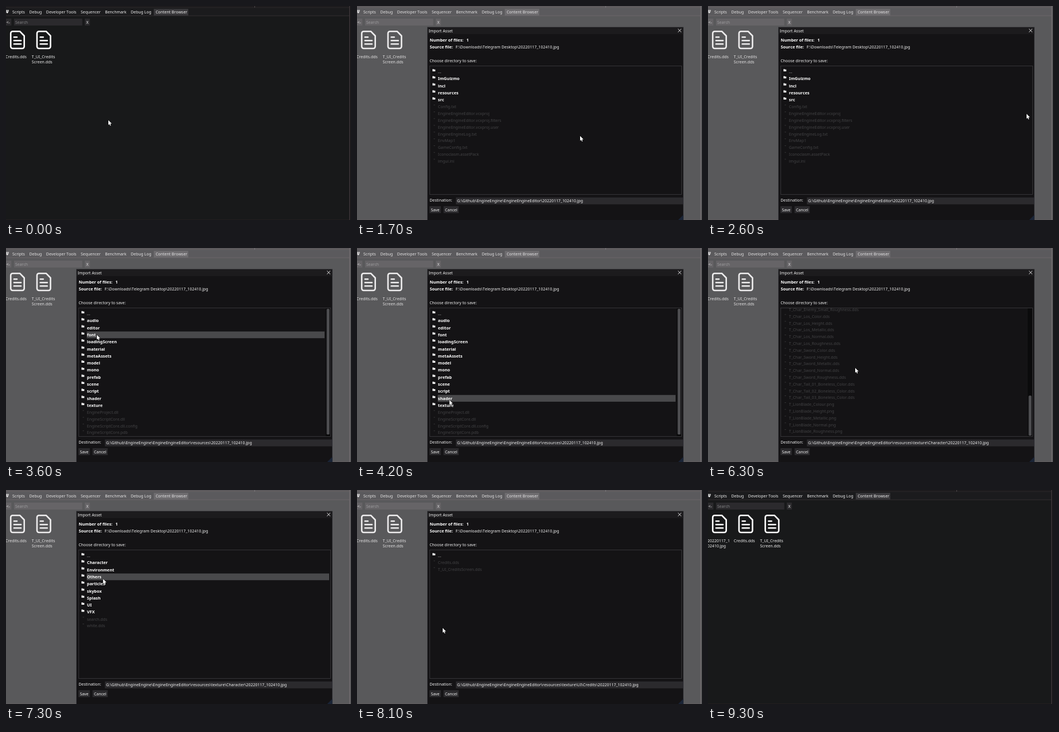
These frames come from a looping animation (600 px wide and 373 px high, 9500 ms). An HTML page with a canvas:

```html
<!DOCTYPE html>
<html lang="en">
<head>
<meta charset="utf-8">
<title>Import Asset</title>
<style>
html, body { margin: 0; width: 100%; height: 100%; overflow: hidden; background: #18191a; }
canvas { display: block; width: 600px; height: 373px; }
</style>
</head>
<body>
<canvas id="stage"></canvas>
<script>
const W = 600, H = 373, LOOP = 9500, STEP = 100;
const canvas = document.getElementById('stage');
const ctx = canvas.getContext('2d');
const dpr = window.devicePixelRatio || 1;
canvas.width = W * dpr;
canvas.height = H * dpr;
ctx.fontKerning = 'none';

const FAMILY = '"Noto Sans", "Open Sans", sans-serif';
const REGULAR = 6.93, BOLD = 7.3, EM = 40;
const FOLDER_ROW = 12.3, FILE_ROW = 11.8, FIRST_ROW = 114.5, LAST_ROW = 319.8;
const LIST = { x: 126.5, y: 104.5, w: 438, h: 224 };
const WHITE = '#f2f2f2', FIELD = '#2b2a2d';
const IMAGE = '20220117_102410.jpg';
const OPEN = 1600, CLOSE = 8400;

const maps = ['Color', 'Height', 'Metallic', 'Normal', 'Roughness'];
const textureSet = (name, ext = 'dds', kinds = maps) => kinds.map(k => `T_${name}_${k}.${ext}`);
const characters = ['Boss', 'Cloak', 'Drone', 'Enemy_Big', 'Enemy_Flying', 'Enemy_Large',
  'Enemy_Medium', 'Enemy_Small', 'Los', 'Sword'];

const dirs = {
  root: {
    folders: ['ImGuizmo', 'incl', 'resources', 'src'],
    files: ['Config.txt', ...['', '.filters', '.user'].map(s => 'EngineEngineEditor.vcxproj' + s),
      'EngineEngineLog.txt', 'EnvMap1', 'GameConfig.txt', 'Iconoclasm.assetPack', 'imgui.ini']
  },
  resources: {
    folders: ['audio', 'editor', 'font', 'loadingScreen', 'material', 'metaAssets', 'model',
      'mono', 'prefab', 'scene', 'script', 'shader', 'texture'],
    files: ['EngineProject.dll', ...['dll', 'dll.config', 'pdb'].map(s => 'EngineScriptCore.' + s)]
  },
  texture: {
    folders: ['Character', 'Environment', 'Others', 'particles', 'skybox', 'Splash', 'UI', 'VFX'],
    files: ['search.dds', 'white.dds']
  },
  character: {
    folders: [],
    files: [
      ...characters.flatMap(n => textureSet('Char_' + n)),
      ...['01', '02', '03'].map(n => `T_Char_Tail_${n}_Boneless_Color.dds`),
      ...textureSet('LionBlade', 'png', ['Colour', ...maps.slice(1)])
    ]
  },
  ui: { folders: ['Credits', 'HUD', 'Icons', 'MainMenu', 'Pause'], files: [] },
  credits: { folders: [], files: ['Credits.dds', 'T_UI_CreditsScreen.dds'] }
};

// A first click selects the destination, the second one opens the folder.
const clicks = [
  { at: 0, path: '', opens: 'root', open: 0 },
  { at: 3400, path: 'resources\\', opens: 'resources', open: 3600 },
  { at: 4400, path: 'resources\\texture\\', opens: 'texture', open: 4700 },
  { at: 5600, path: 'resources\\texture\\Character\\', opens: 'character', open: 5600 },
  { at: 7200, path: 'resources\\texture\\Character\\', opens: 'texture', open: 7200 },
  { at: 7600, path: 'resources\\texture\\UI\\', opens: 'ui', open: 7700 },
  { at: 7900, path: 'resources\\texture\\UI\\Credits\\', opens: 'credits', open: 8000 }
];
const latest = (key, t) => clicks.filter(c => c[key] <= t).pop();

const rowMid = i => FIRST_ROW + FOLDER_ROW * i;
const stop = (arrive, leave, x, y) => ({ arrive, leave, x, y });
const routes = [
  [stop(0, 0, 178, 199), stop(500, 599, 272, 319)],
  [stop(1200, 1299, 248, 359)],
  [
    stop(OPEN, OPEN, 330, 240),
    stop(2200, 2600, 554, 188),
    stop(3300, 3600, 158, rowMid(3)),
    stop(4400, 4700, 161, rowMid(13)),
    stop(5300, 5600, 171, rowMid(1)),
    stop(6300, 6700, 256, 209),
    stop(7100, 7200, 174, rowMid(0)),
    stop(7520, 7700, 163, rowMid(7)),
    stop(7900, 8000, 160, rowMid(1)),
    stop(8300, 8300, 138, 354),
    stop(8800, 9299, 213, 340)
  ]
];

const clamp = v => Math.min(1, Math.max(0, v));
const ramp = (t, from, to) => clamp((t - from) / (to - from));
const mix = (a, b, k) => a + (b - a) * k;
const easeOut = k => Math.sin(k * Math.PI / 2);

function pointerAt(t) {
  const route = routes.find(r => t >= r[0].arrive && t <= r[r.length - 1].leave);
  if (!route) return null;
  const next = route.findIndex(s => t <= s.leave);
  const b = route[next], a = route[next - 1] || b;
  const k = a === b ? 1 : easeOut(ramp(t, a.leave, b.arrive));
  return { x: mix(a.x, b.x, k), y: mix(a.y, b.y, k) };
}

function box(x, y, w, h, fill, stroke) {
  if (fill) { ctx.fillStyle = fill; ctx.fillRect(x, y, w, h); }
  if (stroke) { ctx.strokeStyle = stroke; ctx.lineWidth = 0.8; ctx.strokeRect(x, y, w, h); }
}

// Text is laid out large and scaled down, so that advances are not rounded.
function text(str, x, mid, color = WHITE, bold = false) {
  const scale = (bold ? BOLD : REGULAR) / EM;
  ctx.save();
  ctx.translate(x, mid + 2.5);
  ctx.scale(scale, scale);
  ctx.font = `${bold ? 'bold ' : ''}${EM}px ${FAMILY}`;
  ctx.fillStyle = color;
  ctx.fillText(str, 0, 0);
  const width = ctx.measureText(str).width * scale;
  ctx.restore();
  return width;
}

function button(label, x, y) {
  ctx.font = `${EM}px ${FAMILY}`;
  const width = ctx.measureText(label).width * REGULAR / EM;
  box(x, y, width + 4.8, 12, FIELD);
  text(label, x + 2.4, y + 6.1);
}

function trace(points) {
  ctx.beginPath();
  points.forEach(p => ctx.lineTo(...p));
  ctx.closePath();
}

function shape(points, fill) {
  trace(points);
  ctx.fillStyle = fill;
  ctx.fill();
}

function line(x1, y1, x2, y2) {
  ctx.beginPath();
  ctx.moveTo(x1, y1);
  ctx.lineTo(x2, y2);
  ctx.stroke();
}

function asset(slot, lines) {
  const x = slot * 45.7;
  ctx.save();
  ctx.translate(x + 7, 43);
  ctx.strokeStyle = '#fff';
  ctx.lineWidth = 2.6;
  ctx.lineCap = ctx.lineJoin = 'round';
  ctx.beginPath();
  ctx.moveTo(17, 1.2);
  ctx.lineTo(24.7, 9);
  ctx.arcTo(24.7, 31, 12, 31, 3.5);
  ctx.arcTo(1.2, 31, 1.2, 16, 3.5);
  ctx.arcTo(1.2, 1.2, 12, 1.2, 3.5);
  ctx.closePath();
  ctx.stroke();
  [12, 19, 19].forEach((end, i) => line(7, 11.2 + 6 * i, end, 11.2 + 6 * i));
  ctx.restore();
  lines.forEach((s, i) => text(s, x - 0.9, 88 + i * 9.8));
}

function drawBrowser(saved) {
  box(0, 0, W, H, '#18191a');
  box(0, 0, W, 3, '#1d1b1d');
  box(0, 2.6, W, 0.8, '#393235');
  box(432, 0, 1, 3, '#4a4648');
  box(0, 3.4, 597, 13.4, '#1b1b1d');
  box(0, 16.6, 597, 0.8, '#3b3235');
  box(257, 5, 60, 11.6, '#38373a');

  box(0, 7, 5, 1.3, WHITE);
  shape([[-0.5, 9.3], [5, 9.3], [2.2, 13]], WHITE);
  let x = 11;
  for (const name of ['Scripts', 'Debug', 'Developer Tools', 'Sequencer', 'Benchmark', 'Debug Log', 'Content Browser'])
    x += text(name, x, 10.6) + 7.6;

  button('<-', -1.6, 22);
  box(14, 22, 118.7, 12, FIELD);
  text('Search', 16, 28, '#838385');
  button('X', 137, 22);

  const assets = [['Credits.dds'], ['T_UI_Credits', 'Screen.dds']];
  if (saved) assets.unshift(['20220117_1', '02410.jpg']);
  assets.forEach((lines, i) => asset(i, lines));

  box(597, 0, 1, H, '#453d40');
  box(598, 0, 2, H, '#1b1a1c');
  box(0, 372, 597, 1, '#221e20');
}

function drawList({ folders, files }, scrolled, pointer) {
  const filesTop = rowMid(folders.length) + 12.1;
  const overflow = Math.max(0, filesTop + FILE_ROW * (files.length - 1) - LAST_ROW);
  const right = overflow ? 554 : 562;

  box(LIST.x, LIST.y, LIST.w, LIST.h, '#141315', '#3d3c40');
  ctx.save();
  ctx.beginPath();
  ctx.rect(LIST.x + 0.5, LIST.y + 0.5, LIST.w - 1, LIST.h - 1);
  ctx.clip();
  ctx.translate(0, -overflow * scrolled);

  ['...', ...folders].forEach((name, i) => {
    const mid = rowMid(i), top = mid - 4.6;
    const over = pointer && pointer.x > 141 && pointer.x < right &&
      Math.abs(pointer.y + overflow * scrolled - mid) < FOLDER_ROW / 2;
    if (over) box(140.5, mid - 5.9, right - 140.5, 11.7, '#49494b');
    box(131.3, top, 2.4, 1, WHITE);
    box(131.3, top + 0.8, 4.9, 3.2, WHITE);
    text(name, 140.8, mid, i ? '#fff' : '#c4c4c4', i > 0);
  });
  files.forEach((name, i) => {
    const mid = filesTop + FILE_ROW * i;
    box(133.5, mid - 3.6, 2, 0.8, '#454547');
    text(name, 140.8, mid, '#434345');
  });
  ctx.restore();

  if (overflow) {
    const track = 221, thumb = track * track / (track + overflow);
    box(556, 105, 8, 223, '#0b0b0c');
    ctx.fillStyle = '#4e4e51';
    ctx.beginPath();
    ctx.roundRect(557.6, 106 + (track - thumb) * scrolled, 5, thumb, 1.5);
    ctx.fill();
  }
}

function drawDialog(t, pointer) {
  box(122.5, 37, 445, 340, '#141315', '#343438');
  box(123, 37.4, 444.2, 11.6, '#1c1b1d');
  text('Import Asset', 124.7, 43);
  ctx.strokeStyle = WHITE;
  ctx.lineWidth = 0.9;
  line(558.2, 39.8, 564, 45.6);
  line(564, 39.8, 558.2, 45.6);

  text('Number of files:', 126.5, 59, '#fff', true);
  text('1', 190.3, 59, '#fff', true);
  text('Source file:', 126.5, 71.3, '#fff', true);
  text('F:\\Downloads\\Telegram Desktop\\' + IMAGE, 171.5, 71.3);
  text('Choose directory to save:', 126.2, 95.4);

  const scrolled = ramp(t, 5600, 6200) - ramp(t, 6600, 7000);
  drawList(dirs[latest('open', t).opens], scrolled, pointer);

  text('Destination:', 126.3, 338);
  box(172, 333.7, 395, 12, FIELD);
  text('G:\\Github\\EngineEngine\\EngineEngineEditor\\' + latest('at', t).path + IMAGE, 174, 339.7);
  button('Save', 126, 349);
  button('Cancel', 150.5, 349);
  shape([[567.5, 364], [567.5, 373], [558.5, 373]], '#1a2436');
}

function drawPointer({ x, y }) {
  ctx.save();
  ctx.translate(x, y);
  trace([[0, 0], [0, 8.4], [1.9, 6.7], [3.2, 9.7], [4.5, 9.1], [3.3, 6.2], [5.9, 6]]);
  ctx.lineWidth = 0.8;
  ctx.strokeStyle = '#000';
  ctx.stroke();
  ctx.fillStyle = '#fff';
  ctx.fill();
  ctx.restore();
}

function draw(t) {
  ctx.setTransform(dpr, 0, 0, dpr, 0, 0);
  const pointer = pointerAt(t);
  drawBrowser(t > CLOSE);
  const dim = ramp(t, OPEN - 100, OPEN + 100) - ramp(t, CLOSE - 100, CLOSE + 100);
  if (dim > 0) box(0, 0, W, H, `rgba(206, 201, 206, ${0.36 * dim})`);
  if (t >= OPEN && t < CLOSE) drawDialog(t, pointer);
  if (pointer) drawPointer(pointer);
}

const start = performance.now();
function tick() {
  const t = (performance.now() - start) % LOOP;
  draw(Math.floor(t / STEP) * STEP);
  requestAnimationFrame(tick);
}
tick();
</script>
</body>
</html>
```
